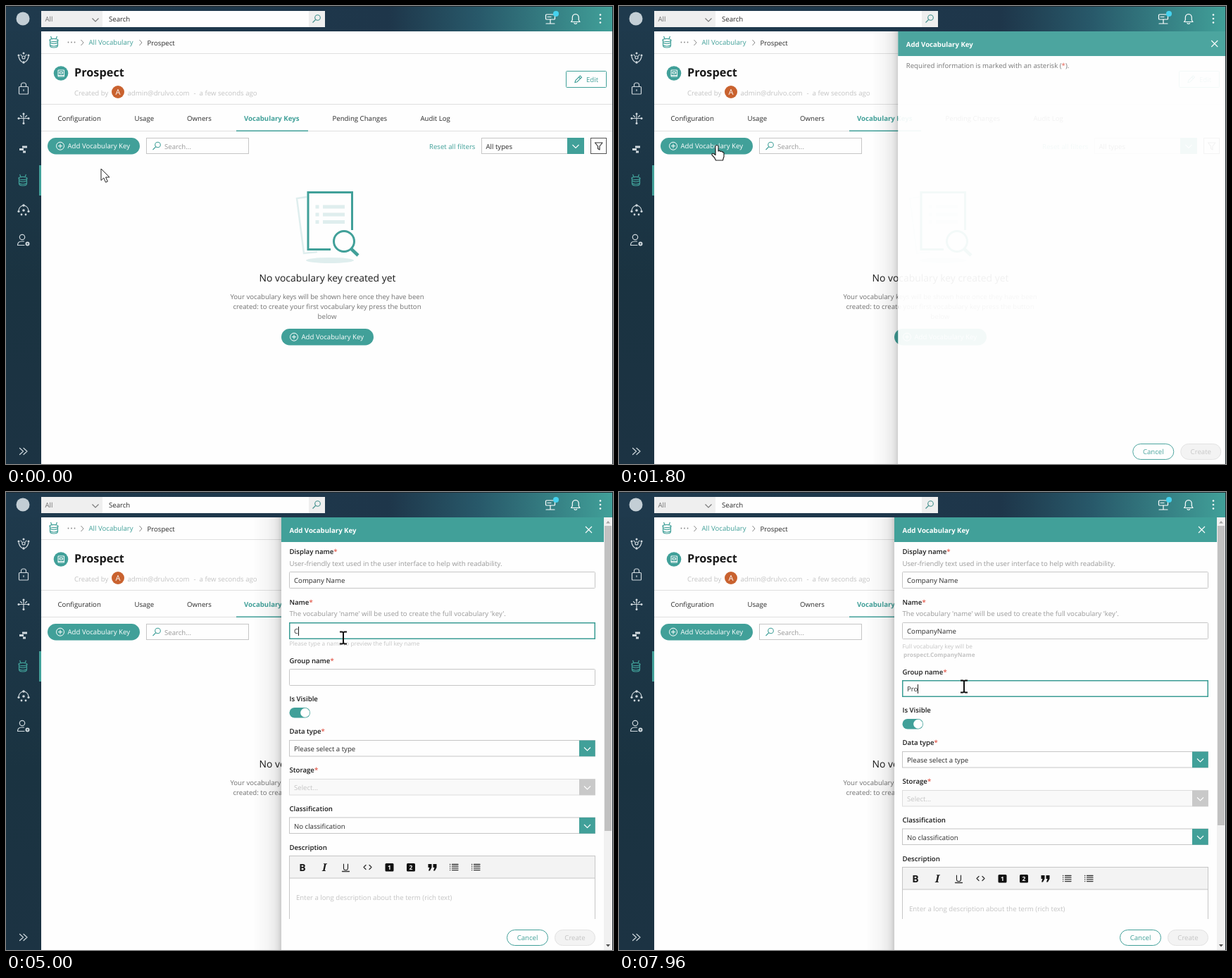
Write an HTML page that moves like this. It is 862 px wide and 650 px high and loops after 8 s.

```html
<!DOCTYPE html>
<html lang="en">
<head>
<meta charset="utf-8">
<title>Add vocabulary key</title>
<style>
html, body { margin: 0; width: 100%; height: 100%; overflow: hidden; background: #fefefe; }
svg { display: block; width: 862px; height: 650px; }
text { font: 9.65px "Open Sans", "Noto Sans", sans-serif; fill: #2a2a2a; text-rendering: geometricPrecision; white-space: pre; }
.b { font-weight: 700; }
.label text { font-weight: 600; fill: #1a1a1a; }
.label tspan, .red { fill: #e2584a; }
.teal { fill: #41a099; }
.white { fill: #fff; }
.help { fill: #999; }
.grey { fill: #707070; }
.dark { fill: #1a1a1a; }
.pale { fill: #c4c4c4; }
.hint { font-size: 8.28px; fill: #c4c4c4; }
.mid { text-anchor: middle; }
.line { fill: none; stroke: #333; stroke-linecap: round; stroke-linejoin: round; }
.tealLine { fill: none; stroke: #41a099; }
.icons { fill: none; stroke: #cfd8dd; stroke-width: 1.2; stroke-linecap: round; stroke-linejoin: round; }
.dots { fill: #cfd8dd; stroke: none; }
.box { fill: #fefefe; stroke: #c6c6c6; }
.rule { fill: #e0e0e0; }
.focus { fill: none; stroke: #3a9c94; stroke-width: 1.5; }

#panel { animation: slide 8s infinite; }
#pointer { animation: move 8s infinite; }
#arc { transform-origin: 819px 196px; animation: spin 1333.333ms -1036ms linear infinite; }
@keyframes slide {
  0%, 20.625% { transform: translateX(91px); opacity: 0; animation-timing-function: cubic-bezier(.1, .9, .2, 1); }
  25.2125%, 100% { transform: none; opacity: 1; }
}
@keyframes move {
  0%, 15.75% { transform: translate(135px, 231px); animation-timing-function: ease-in-out; }
  19%, 23.1% { transform: translate(139px, 198px); animation-timing-function: ease-in; }
  25.75% { transform: translate(284px, 189px); animation-timing-function: ease-out; }
  28.6%, 57% { transform: translate(478px, 135px); animation-timing-function: ease-in-out; }
  60.4%, 81.25% { transform: translate(479px, 207px); animation-timing-function: ease-in-out; }
  84.5%, 91.6% { transform: translate(487px, 268px); animation-timing-function: ease-in-out; }
  93.75%, 100% { transform: translate(490px, 276px); }
}
@keyframes spin { to { transform: rotate(360deg); } }
</style>
</head>
<body>
<svg viewBox="0 0 862 650">
  <defs>
    <linearGradient id="top">
      <stop offset="0" stop-color="#1f3a4d"/><stop offset=".63" stop-color="#1e364a"/>
      <stop offset=".78" stop-color="#28596a"/><stop offset="1" stop-color="#41a099"/>
    </linearGradient>
    <linearGradient id="side" x2="0" y2="1">
      <stop offset="0" stop-color="#1f3a4d"/><stop offset=".6" stop-color="#1a3341"/><stop offset="1" stop-color="#1c3343"/>
    </linearGradient>
    <linearGradient id="shade">
      <stop offset="0" stop-opacity="0"/><stop offset=".5" stop-opacity=".035"/>
      <stop offset=".75" stop-opacity=".072"/><stop offset=".88" stop-opacity=".117"/><stop offset="1" stop-opacity=".2"/>
    </linearGradient>
    <clipPath id="scroller"><rect x="391" y="71" width="458" height="535"/></clipPath>
    <clipPath id="reveal"><rect id="revealBox" x="470" y="145" width="130" height="33"/></clipPath>
    <path id="chevron" d="M-4.5 -2L0 2.5L4.5 -2" fill="none" stroke-width="1.1"/>
    <g id="jar" fill="none" stroke-width="1.2">
      <path d="M-5.5 -3V5Q-5.5 8 0 8Q5.5 8 5.5 5V-3M-5.5 1Q0 4 5.5 1M-5.5 4.5Q0 7.5 5.5 4.5"/>
      <ellipse cy="-2.5" rx="6" ry="2.2"/><path d="M-3 -4.5L-4.5 -8M3 -4.5L4.5 -8"/>
    </g>
    <g id="lens" fill="none" stroke-width="1.1"><circle cx="1.5" cy="-1.5" r="3.8"/><path d="M-1.5 1.5L-5.5 5.5"/></g>
    <g id="list" class="line" stroke-width="1.3">
      <path d="M-2.5 -4H6M-2.5 -1.3H6M-2.5 1.4H6M-2.5 4.1H6"/>
      <path d="M-5.5 -4h.3M-5.5 -1.3h.3M-5.5 1.4h.3M-5.5 4.1h.3"/>
    </g>
  </defs>

  <rect width="862" height="650" fill="#fefefe"/>
  <rect width="50" height="650" fill="url(#side)"/>
  <rect width="862" height="36" fill="url(#top)"/>
  <circle cx="24" cy="18" r="9.5" fill="#c3ced5"/>

  <!-- top bar -->
  <rect x="50" y="7" width="403" height="23" fill="#fefefe"/>
  <path d="M50 7h87v23H50zM430 7h23v23H430z" fill="#efefef"/>
  <text x="55.5" y="22" class="grey">All</text><text x="146" y="22">Search</text>
  <use href="#chevron" x="127" y="19.5" stroke="#777"/>
  <use href="#lens" x="441" y="18" stroke="#41908c"/>
  <g class="icons" style="stroke:#fff">
    <rect x="766.5" y="12" width="13" height="7" rx="1"/><path d="M769 15.5h5M773 19v4M767 25h3M773 23v2M776 25h3M770 25h6"/>
    <path d="M802.5 22.5h12.5l-1.7-2.5v-3.5q0-4.5-4.5-5-4.5.5-4.5 5V20zM807 24.5q1.8 1.5 3.6 0"/>
  </g>
  <circle cx="781" cy="11" r="4" fill="#45d2ef"/>
  <g class="white"><circle cx="844" cy="12.5" r="1.3"/><circle cx="844" cy="18" r="1.3"/><circle cx="844" cy="23.5" r="1.3"/></g>

  <!-- side bar -->
  <rect x="47" y="226" width="3" height="43" class="teal"/>
  <g class="icons">
    <circle cx="25" cy="73" r="2"/><path d="M18 72q1.5 6 5 7.5M32 72q-1.5 6-5 7.5M21 69l1.5 2M29 69l-1.5 2"/>
    <g class="dots"><circle cx="25" cy="67" r="1.5"/><circle cx="18" cy="70" r="1.5"/><circle cx="32" cy="70" r="1.5"/><circle cx="25" cy="80" r="1.8"/></g>
    <rect x="18.5" y="114.5" width="13" height="10.5" rx="1"/><path d="M21.5 114.5v-2.5q0-3 3.5-3t3.5 3v2.5M25 118.5v2"/>
    <path d="M18 159.500h14M25 153v14M20.500 155.500l2 2M29.500 155.500l-2 2"/>
    <g class="dots"><circle cx="25" cy="153" r="1.5"/><circle cx="18" cy="159.500" r="1.5"/><circle cx="32" cy="159.500" r="1.5"/><circle cx="25" cy="166.500" r="1.5"/></g>
    <path d="M23 200h7M19 203.5h6M24 207h4" stroke-width="3" stroke-linecap="butt"/>
    <path d="M18 290q1-6 7-7 6 1 7 7"/>
    <g class="dots"><circle cx="25" cy="283" r="1.8"/><circle cx="25" cy="290" r="1.8"/><circle cx="18" cy="291.5" r="1.6"/><circle cx="32" cy="291.5" r="1.6"/><circle cx="22" cy="296" r="1.4"/><circle cx="28" cy="296" r="1.4"/></g>
    <circle cx="23" cy="328" r="3.7"/><path d="M26 339.5h-9.5q0-5.5 6-5.5h3"/>
    <circle cx="30.500" cy="337.5" r="2" stroke-width="2"/>
    <path d="M19.5 627.5l5 4.5-5 4.5M25 627.5l5 4.5-5 4.5"/>
  </g>
  <use href="#jar" x="24" y="247" stroke="#41a099"/>

  <!-- page -->
  <path class="rule" d="M50 67h811v1H50zM50 139h811v1H50zM50 177h811v1H50z"/>
  <use href="#jar" x="68" y="51" stroke="#41a099"/>
  <g fill="#888"><circle cx="88.5" cy="51.5" r=".9"/><circle cx="93" cy="51.5" r=".9"/><circle cx="97.5" cy="51.5" r=".9"/></g>
  <path d="M106.5 48l3.5 4-3.5 4M189.5 48l3.5 4-3.5 4" fill="none" stroke="#888"/>
  <text x="117.5" y="55" class="teal">All Vocabulary</text><text x="200.5" y="55.5">Prospect</text>
  <circle cx="78" cy="95.5" r="10.3" class="teal"/>
  <path d="M74 91h8.5v9H74zM76 93.5h4.5v2.5H76zM74 98.5h8" fill="none" stroke="#fff"/>
  <text x="97" y="100" class="b dark" style="font-size:16.3px">Prospect</text>
  <text x="97" y="127" class="pale">Created by</text>
  <circle cx="159" cy="122" r="9" fill="#c9622f"/><text x="159" y="126" class="white mid" style="font-size:11px">A</text>
  <text x="172.5" y="127" class="pale">admin@drulvo.com</text><text x="266.5" y="127" class="pale">-  a few seconds ago</text>
  <rect x="795.5" y="92.5" width="57" height="23" rx="1" class="tealLine"/>
  <path d="M808 108.5l.8-3 6.5-6.5 2.2 2.2-6.5 6.5zM813.5 101l2 2" class="tealLine" stroke-width="1.1"/>
  <text x="824" y="108" class="teal">Edit</text>

  <text x="73.5" y="163">Configuration</text><text x="182.5" y="163">Usage</text><text x="257" y="163">Owners</text>
  <text x="338" y="163" class="b teal">Vocabulary Keys</text>
  <text x="463.5" y="163">Pending Changes</text><text x="588.5" y="163">Audit Log</text>
  <rect x="327" y="176.5" width="102" height="1.5" class="teal"/>

  <g id="add">
    <rect x="59" y="187" width="131" height="23.5" rx="11.7" class="teal"/>
    <g fill="none" stroke="#fff"><circle cx="77" cy="198.7" r="5.5"/><path d="M74 198.7h6M77 195.7v6"/></g>
    <text x="87.5" y="202.3" class="white">Add Vocabulary Key</text>
  </g>
  <use href="#add" x="332" y="271"/>
  <rect x="199.5" y="187.5" width="145" height="22" class="box"/>
  <use href="#lens" x="214" y="198.5" stroke="#41a099"/><text x="225" y="202.5" class="help">Search...</text>
  <text x="601" y="202.5" class="teal">Reset all filters</text>
  <rect x="675.5" y="187.5" width="145" height="22" class="box"/><text x="681.5" y="203">All types</text>
  <rect x="797" y="187" width="24" height="23" class="teal"/><use href="#chevron" x="809" y="199" stroke="#fff"/>
  <rect x="830.5" y="187.5" width="22" height="22" class="box" style="stroke:#555"/>
  <path d="M836.5 194h10.5l-4 5v5l-2.5-1.5v-3.5z" class="line" stroke-width="1.2"/>

  <!-- empty state -->
  <path d="M427 271L413 273L423 351L442 349" fill="none" stroke="#dfeeee" stroke-width="2.5"/>
  <ellipse cx="460" cy="361" rx="34" ry="4" fill="#dfeeee"/>
  <path d="M461 345.5H429V264.5H491.5V318" class="tealLine" stroke-width="3"/>
  <path d="M450 285h31M450 296h31M450 306.5h31M439.5 285h5M439.5 296h5M439.5 306.5h5" stroke="#dfeeee" stroke-width="5"/>
  <circle cx="480" cy="334" r="14.5" class="tealLine" stroke-width="3"/><path d="M490.5 345L500 354" class="tealLine" stroke-width="4.5"/>
  <g class="mid">
    <text x="456.5" y="391" class="dark" style="font-size:13.9px">No vocabulary key created yet</text>
    <text x="456" y="415.5" class="grey">Your vocabulary keys will be shown here once they have been</text>
    <text x="456" y="429.5" class="grey">created: to create your first vocabulary key press the button</text>
    <text x="456" y="443.5" class="grey">below</text>
  </g>

  <!-- side panel -->
  <g id="panel">
    <rect x="351" y="36" width="40" height="614" fill="url(#shade)"/>
    <rect x="391" y="36" width="471" height="614" fill="#fefefe"/>
    <rect x="391" y="36" width="471" height="35" class="teal"/>
    <text x="402.5" y="58" class="b white">Add Vocabulary Key</text>
    <text id="required" x="402.5" y="87.5" class="grey">Required information is marked with an asterisk (<tspan class="red">*</tspan>).</text>

    <g id="form" clip-path="url(#scroller)">
      <g class="label"><text x="402.5" y="87.5">Display name<tspan>*</tspan></text><text x="402.5" y="159.5">Name<tspan>*</tspan></text></g>
      <text x="402.5" y="104.5" class="help">User-friendly text used in the user interface to help with readability.</text>
      <text x="402.5" y="176" class="help">The vocabulary 'name' will be used to create the full vocabulary 'key'.</text>
      <rect x="402.5" y="113.5" width="434" height="23" rx="1" class="box"/>
      <rect id="focus0" x="402.75" y="113.75" width="433.5" height="22.5" class="focus"/>
      <rect id="nameBox" x="402.5" y="185.5" width="434" height="23" rx="1" class="box"/>
      <rect id="focus1" x="402.75" y="185.75" width="433.5" height="22.5" class="focus"/>
      <g id="spinner" fill="none" stroke-width="1.5">
        <circle cx="819" cy="196" r="5.5" stroke="#cfe5e3"/>
        <path id="arc" d="M819 190.5A5.5 5.5 0 0 1 822.9 199.9" stroke="#41a099"/>
      </g>
      <text id="empty" x="402.5" y="217.5" class="hint">Please type a name to preview the full key name</text>
      <g id="preview"><text x="402.5" y="222" class="hint">Full vocabulary key will be</text><text id="key" x="404" y="234" class="hint b"></text></g>

      <g id="lower">
        <g class="label">
          <text x="402.5" y="242.5">Group name<tspan>*</tspan></text><text x="402.5" y="297">Is Visible</text>
          <text x="402.5" y="343">Data type<tspan>*</tspan></text><text x="402.5" y="398">Storage<tspan>*</tspan></text>
          <text x="402.5" y="453">Classification</text><text x="402.5" y="507.5">Description</text>
        </g>
        <rect x="402.5" y="251.5" width="434" height="23" rx="1" class="box"/>
        <rect id="hover2" x="402.5" y="251.5" width="434" height="23" rx="1" class="tealLine"/>
        <rect id="focus2" x="402.75" y="251.75" width="433.5" height="22.5" class="focus"/>
        <rect x="402.5" y="306" width="29.5" height="14.5" rx="7.25" class="teal"/><circle cx="424.7" cy="313.25" r="6.5" class="white"/>
        <rect x="402.5" y="352.5" width="434" height="22.5" class="box"/><text x="409" y="368">Please select a type</text>
        <rect x="814" y="352.5" width="22.7" height="22.7" class="teal"/><use href="#chevron" x="825.5" y="364.5" stroke="#fff"/>
        <rect x="402.5" y="407.5" width="434" height="22.5" class="box" style="fill:#f9f9f9;stroke:#ddd"/><text x="409" y="423" class="pale">Select...</text>
        <rect x="814" y="407.5" width="22.7" height="22.7" fill="#c9c9c9"/><use href="#chevron" x="825.5" y="419.5" stroke="#fff"/>
        <rect x="402.5" y="462" width="434" height="22.5" class="box"/><text x="409" y="477.5">No classification</text>
        <rect x="814" y="462" width="22.7" height="22.7" class="teal"/><use href="#chevron" x="825.5" y="474" stroke="#fff"/>

        <rect x="402.5" y="516.5" width="434" height="120" class="box"/>
        <rect x="402.5" y="516.5" width="434" height="31.5" fill="#f3f3f3" stroke="#c6c6c6"/>
        <g class="mid">
          <text x="421" y="537.5" class="b dark" style="font-size:14px">B</text>
          <text x="452" y="537.5" class="dark" style="font:italic bold 15px 'Noto Serif',serif">I</text>
          <text x="482.5" y="536.5" class="dark" style="font-size:13px">U</text>
        </g>
        <path d="M477.5 538.5h10M511 529.5l-3 3 3 3M516 529.5l3 3-3 3" class="line" stroke-width="1.3"/>
        <rect x="538.5" y="527" width="12" height="11.5" rx="1.5" fill="#111"/><rect x="569" y="527" width="12" height="11.5" rx="1.5" fill="#111"/>
        <text x="544.5" y="536" class="b white mid" style="font-size:8.5px">1</text><text x="575" y="536" class="b white mid" style="font-size:8.5px">2</text>
        <path d="M599.5 528h5v5l-2.5 4.5h-2l1.5-4.5h-2zM606.5 528h5v5l-2.5 4.5h-2l1.5-4.5h-2z" fill="#111"/>
        <use href="#list" x="636" y="532.5"/><use href="#list" x="667" y="532.5"/>
        <text x="412" y="578.5" class="pale">Enter a long description about the term (rich text)</text>
      </g>
      <text id="field0" x="409" y="129"></text><text id="field1" x="409" y="200.7"></text><text id="field2" x="409" y="283"></text>
      <rect id="caret" width="1" height="13" fill="#222"/>
      <g id="menu" clip-path="url(#reveal)">
        <rect x="479" y="145" width="115" height="32" fill="#fefefe" stroke="#ececec"/>
        <text x="488.5" y="162" class="dark">Customer</text>
      </g>
    </g>

    <g id="scrollbar">
      <rect x="849" y="36" width="13" height="614" fill="#f1f1f1"/>
      <rect id="thumb" x="850" y="48" width="10" height="433" fill="#c1c1c1"/>
      <path d="M852 44.5h6l-3-3.5z" fill="#a3a3a3"/><path d="M852 642h6l-3 3.5z" fill="#505050"/>
    </g>
    <g id="actions">
      <path d="M823 49l9 9M832 49l-9 9" stroke="#fff" stroke-width="1.1"/>
      <rect x="711.5" y="621.5" width="58" height="22" rx="11" class="tealLine"/><text x="740.5" y="636" class="mid teal">Cancel</text>
      <rect x="779.5" y="621.5" width="57" height="22" rx="11" fill="#f3f3f3" stroke="#e2e2e2"/><text x="808" y="636" class="mid pale">Create</text>
    </g>
  </g>

  <path d="M0 0h862v650h-1V1H0z" fill="#20292f"/>

  <g id="pointer">
    <path id="arrow" d="M0 0V16.5L3.8 13L6.5 19.2L9.3 18L6.6 12H12z" fill="#fff" stroke="#222" stroke-linejoin="round"/>
    <path id="hand" d="M-2 1Q0-2 2 1V8Q4 6.5 5 8.5Q7 7.5 8 9.5Q10 9 10 11.5V16Q9 18 8.5 21H-1.5Q-3 17-7 13.5Q-7.5 10.5-4.5 11.5L-2 13.5z" fill="#fff" stroke="#222" stroke-width="1.2" stroke-linejoin="round"/>
    <path id="beam" d="M-5-8.5H-1.5L0-7.5L1.5-8.5H5M0-7.5V7.5M-5 8.5H-1.5L0 7.5L1.5 8.5H5" fill="none" stroke="#111" stroke-width="2"/>
  </g>
</svg>
<script>
const LOOP = 8000, FORM = 2000, SHIFT = 5060;
const $ = id => document.getElementById(id);
const show = (id, on) => { $(id).style.display = on ? '' : 'none'; };

// Each field: its text, the time of every key stroke, when it holds focus.
const fields = [
  { text: 'Company Name', keys: [2830, 2960, 3100, 3230, 3400, 3500, 3620, 3730, 3900, 4060, 4190, 4360], from: FORM, to: 4800 },
  { text: 'CompanyName', keys: [5000, 5130, 5250, 5370, 5490, 5600, 5730, 5900, 6040, 6170, 6300], from: 4800, to: 6700 },
  { text: 'Pro', keys: [7660, 7800, 7960], from: 7400, to: LOOP }
];
const typed = (f, t) => f.text.slice(0, f.keys.filter(k => k <= t).length);

function draw(t) {
  const within = (a, b) => t >= a && t < b;
  const open = t >= FORM, shifted = t >= SHIFT;

  show('required', !open);
  show('form', open);
  show('scrollbar', open);
  $('actions').setAttribute('transform', `translate(${open ? 0 : 13})`);

  show('empty', !shifted);
  show('preview', shifted);
  $('key').textContent = 'prospect.' + typed(fields[1], t - 60);
  $('lower').setAttribute('transform', `translate(0 ${shifted ? 16 : 0})`);
  $('thumb').setAttribute('height', shifted ? 425 : 433);

  const checking = within(SHIFT, 6360);
  show('spinner', checking);
  $('nameBox').setAttribute('width', checking ? 399 : 434);
  $('focus1').setAttribute('width', checking ? 398.5 : 433.5);
  show('hover2', t >= 6700);

  show('caret', false);
  fields.forEach((f, i) => {
    const el = $('field' + i), active = within(f.from, f.to);
    el.textContent = typed(f, t);
    show('focus' + i, active);
    if (active && el.textContent) {
      show('caret', true);
      $('caret').setAttribute('x', Math.round(409 + el.getComputedTextLength()));
      $('caret').setAttribute('y', Math.round(el.getAttribute('y') - 10));
    }
  });

  show('menu', within(2290, 3000));
  $('revealBox').setAttribute('height', Math.min(33, 22 + (t - 2290) / 8));

  show('arrow', t < 1420 || within(1900, 2230));
  show('hand', within(1420, 1900));
  show('beam', t >= 2230);
}

let start;
function tick(now) {
  start ??= now;
  draw((now - start) % LOOP);
  requestAnimationFrame(tick);
}
draw(0);
requestAnimationFrame(tick);
</script>
</body>
</html>
```
